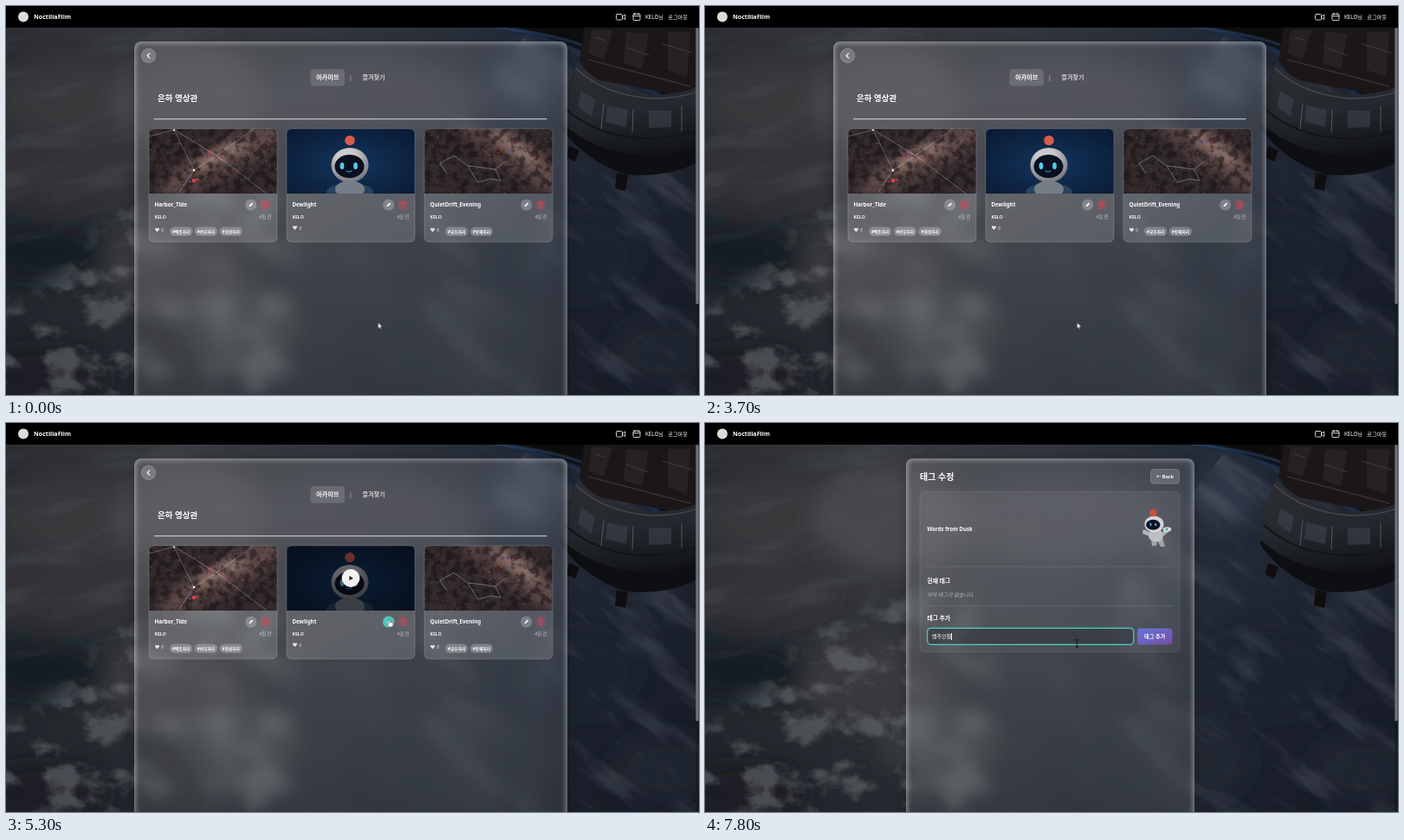
Animation of 800 by 450 pixels, one loop 8000 ms. Source, as an HTML page:

```html
<!DOCTYPE html>
<html lang="ko">
<head>
<meta charset="utf-8">
<title>은하 영상관</title>
<style>
html, body { margin: 0; width: 100%; height: 100%; overflow: hidden; background: #000; }
#stage { position: relative; width: 800px; height: 450px; overflow: hidden; }
#stage > * { position: absolute; }
svg { left: 0; top: 0; width: 800px; height: 450px; }
text, .typing { font-family: "Noto Sans", "Noto Sans CJK KR", sans-serif; fill: #fff; }
.b { font-weight: 700; }
.m { font-weight: 600; }
.mid { text-anchor: middle; }
.end { text-anchor: end; }
.line { fill: none; stroke: #fff; stroke-linecap: round; stroke-linejoin: round; }

.glass {
  top: 40.5px; height: 430px; box-sizing: border-box; border-radius: 8px;
  border: 1px solid rgba(255,255,255,.28);
  background: linear-gradient(rgba(255,255,255,.12), rgba(255,255,255,.085));
  backdrop-filter: blur(9px);
  box-shadow: inset 0 0 6px rgba(255,255,255,.5), 0 4px 14px rgba(0,0,0,.28);
}
.wide { left: 148px; width: 500px; }
.slim { left: 231.5px; width: 333px; }

.page1, .page2, .hover, .hot, .focus, .cursor, .arrow, .hand, .beam, .strip, .caret {
  animation: 8s step-end infinite;
}
.page1 { animation-name: page1; }
.page2 { animation-name: page2; }
.hover { animation-name: hover; }
.hot { animation-name: hot; }
.focus { animation-name: focus; }
.cursor { animation-name: move; }
.arrow { animation-name: arrow; }
.hand { animation-name: hand; }
.beam { animation-name: page2; }
.strip { animation-name: type; }
.caret { animation-name: blink; }

@keyframes page1 { 0% { opacity: 1 } 71.25%, to { opacity: 0 } }
@keyframes page2 { 0% { opacity: 0 } 71.25%, to { opacity: 1 } }
@keyframes hover { 0% { opacity: 0 } 53.75% { opacity: .4 } 55% { opacity: .75 } 56.25%, to { opacity: 1 } }
@keyframes hot { 0% { opacity: 0 } 57.5% { opacity: .35 } 58.75% { opacity: .65 } 60% { opacity: .9 } 61.25%, to { opacity: 1 } }
@keyframes focus { 0% { opacity: 0 } 71.25% { opacity: .3 } 72.5% { opacity: .7 } 73.75%, to { opacity: 1 } }
@keyframes arrow { 0% { opacity: 1 } 53.75%, to { opacity: 0 } }
@keyframes hand { 0% { opacity: 0 } 53.75% { opacity: 1 } 71.25%, to { opacity: 0 } }
@keyframes move {
  0% { transform: translate(429.5px, 366px) }
  52.5% { transform: translate(435px, 304px) }
  53.75% { transform: translate(440px, 249px) }
  55% { transform: translate(441px, 238px) }
  56.25% { transform: translate(442px, 230px) }
  57.5% { transform: translate(442.5px, 227px) }
  71.25%, to { transform: translate(429.5px, 255px) }
}
@keyframes type {
  0% { transform: translateY(0) }
  78.75% { transform: translateY(-14px) }
  80% { transform: translateY(-28px) }
  82.5% { transform: translateY(-42px) }
  86.25% { transform: translateY(-56px) }
  87.5% { transform: translateY(-70px) }
  88.75% { transform: translateY(-84px) }
  90% { transform: translateY(-98px) }
  91.25% { transform: translateY(-112px) }
  92.5% { transform: translateY(-126px) }
  93.75% { transform: translateY(-140px) }
  95%, to { transform: translateY(-154px) }
}
@keyframes blink { 0% { opacity: 1 } 77.5% { opacity: 0 } 78.75%, to { opacity: 1 } }

.typing { left: 262px; top: 240px; width: 200px; height: 14px; overflow: hidden; color: #fff; font-size: 6.1px; font-weight: 500; }
.strip div { height: 14px; line-height: 14px; white-space: pre; }
.strip .hint { color: #a3a6ac; font-size: 5.9px; font-weight: 400; }
.caret { display: inline-block; width: .7px; height: 8px; margin-right: -.7px; background: #fff; vertical-align: -1.6px; }
</style>
</head>
<body>
<div id="stage">

<svg viewBox="0 0 800 450">
  <defs>
    <linearGradient id="earth">
      <stop offset="0" stop-color="#2b2d32"/><stop offset=".25" stop-color="#37393d"/>
      <stop offset=".5" stop-color="#31353d"/><stop offset=".75" stop-color="#232a37"/>
      <stop offset="1" stop-color="#1a202c"/>
    </linearGradient>
    <linearGradient id="fall" x2="0" y2="1">
      <stop offset=".35" stop-color="#12161f" stop-opacity="0"/><stop offset="1" stop-color="#12161f" stop-opacity=".5"/>
    </linearGradient>
    <linearGradient id="metal" x2=".2" y2="1">
      <stop offset="0" stop-color="#2c2e33"/><stop offset=".5" stop-color="#25282e"/><stop offset="1" stop-color="#0d0f13"/>
    </linearGradient>
    <filter id="soft" x="-40%" y="-40%" width="180%" height="180%"><feGaussianBlur stdDeviation="13"/></filter>
    <filter id="haze"><feGaussianBlur stdDeviation="1.2"/></filter>
    <filter id="cloud" x="0" y="0" width="100%" height="100%" color-interpolation-filters="sRGB">
      <feTurbulence type="fractalNoise" baseFrequency=".022 .03" numOctaves="6" seed="23"/>
      <feColorMatrix values="0 0 0 0 .4  0 0 0 0 .41  0 0 0 0 .43  5 0 0 0 -2.4"/>
    </filter>
    <filter id="streak" x="0" y="0" width="100%" height="100%" color-interpolation-filters="sRGB">
      <feTurbulence type="fractalNoise" baseFrequency=".009 .035" numOctaves="5" seed="5"/>
      <feColorMatrix values="0 0 0 0 .38  0 0 0 0 .4  0 0 0 0 .44  3.5 0 0 0 -1.7"/>
    </filter>
    <mask id="mass"><path d="M-30 370 60 315 130 235 240 190 330 220V480H-30Z" fill="#fff" filter="url(#soft)"/></mask>
  </defs>
  <rect width="800" height="450" fill="url(#earth)"/>
  <rect width="800" height="450" fill="url(#fall)"/>
  <g filter="url(#soft)">
    <ellipse cx="70" cy="110" rx="85" ry="45" fill="#413e40" opacity=".55"/>
    <ellipse cx="215" cy="110" rx="90" ry="60" fill="#505155" opacity=".7"/>
    <ellipse cx="60" cy="195" rx="90" ry="30" fill="#393637" opacity=".8"/>
    <ellipse cx="40" cy="285" rx="75" ry="32" fill="#14181f" opacity=".8"/>
    <ellipse cx="190" cy="300" rx="80" ry="50" fill="#414247" opacity=".6"/>
    <ellipse cx="270" cy="370" rx="70" ry="40" fill="#404247" opacity=".7"/>
    <ellipse cx="40" cy="430" rx="80" ry="35" fill="#191d24" opacity=".7"/>
    <ellipse cx="420" cy="110" rx="130" ry="50" fill="#434750" opacity=".6"/>
    <ellipse cx="600" cy="85" rx="40" ry="35" fill="#343f4f" opacity=".7"/>
    <ellipse cx="520" cy="390" rx="110" ry="60" fill="#252a35" opacity=".7"/>
    <ellipse cx="650" cy="290" rx="80" ry="50" fill="#1a2130" opacity=".7"/>
    <ellipse cx="760" cy="400" rx="60" ry="40" fill="#262b36" opacity=".7"/>
  </g>
  <g mask="url(#mass)"><rect y="150" width="340" height="300" filter="url(#cloud)" opacity=".6"/></g>
  <g transform="rotate(-12)"><rect x="-60" y="20" width="300" height="250" filter="url(#streak)" opacity=".2"/></g>
  <g transform="rotate(38 660 250)"><rect x="480" y="60" width="420" height="420" filter="url(#streak)" opacity=".32"/></g>
  <path d="M552 22Q690 44 805 150V20Z" fill="#1d2f4c" filter="url(#haze)"/>
  <path d="M566 22Q695 44 805 140V20Z" fill="#07090e" filter="url(#haze)"/>
  <path d="M562 24Q625 31 664 45" class="line" style="stroke:#33557f" stroke-width="1.5" filter="url(#haze)"/>
  <g>
    <path d="M668 25 662 62 676 84 800 108V25Z" fill="#1b1718"/>
    <path d="M676 28 672 55 690 62 700 28ZM716 30 713 66 734 73 742 32ZM764 30V74L786 82 790 30Z" fill="#282122"/>
    <path d="M680 36 692 40M716 48 742 57M758 44 792 54M672 62 790 93" class="line" style="stroke:#403837" stroke-width="1.1"/>
    <path d="M660 66Q690 98 745 102 780 103 800 92V178Q765 198 716 194 668 178 641 141 640 100 660 66Z" fill="url(#metal)"/>
    <path d="M658 72Q690 103 745 107 780 107 800 98" class="line" style="stroke:#484b51" stroke-width="1.3"/>
    <path d="M645 118Q680 150 735 153 775 153 800 143" class="line" style="stroke:#121418" stroke-width="2"/>
    <path d="M664 98 680 108 676 128 660 116ZM694 115 718 120 716 140 692 134ZM742 121 768 121V140L742 141Z" fill="#3d434b" opacity=".6"/>
    <path d="M690 113 687 142M724 120 723 146M780 116V144" class="line" style="stroke:#5b5f66" stroke-width=".9"/>
    <path d="M641 135Q680 170 740 173 775 172 800 162V180Q765 199 716 195 668 179 641 141Z" fill="#0d0f13"/>
    <path d="M650 162 662 167 657 180 647 175ZM705 193 718 196 715 214 703 211Z" fill="#0f0d10"/>
  </g>
</svg>

<div class="glass wide page1"></div>
<svg class="page1" viewBox="0 0 800 450">
  <defs>
    <clipPath id="thumb"><path d="M0 75V6Q0 0 6 0H142Q148 0 148 6V75Z"/></clipPath>
    <filter id="glow" x="-50%" y="-50%" width="200%" height="200%"><feGaussianBlur stdDeviation="6"/></filter>
    <filter id="dust" x="0" y="0" width="100%" height="100%" color-interpolation-filters="sRGB">
      <feTurbulence type="fractalNoise" baseFrequency=".12" numOctaves="4" seed="3"/>
      <feColorMatrix values="0 0 0 0 .08  0 0 0 0 .06  0 0 0 0 .07  4 0 0 0 -1.7"/>
    </filter>
    <radialGradient id="night" cy=".55" r=".7"><stop stop-color="#12355c"/><stop offset="1" stop-color="#0a1a33"/></radialGradient>
    <radialGradient id="shell" cx=".4" cy=".25" r=".8"><stop offset=".3" stop-color="#cbcbcb"/><stop offset="1" stop-color="#6d7279"/></radialGradient>
  </defs>
  <circle cx="164.5" cy="57.5" r="8.3" fill="#fff" fill-opacity=".22" stroke="#fff" stroke-opacity=".35" stroke-width=".6"/>
  <path d="M165.8 54.8 163.2 57.5 165.8 60.2" class="line" stroke-width="1.1"/>
  <rect x="351.5" y="73" width="39.5" height="19.5" rx="4" fill="#fff" opacity=".15"/>
  <text x="371.2" y="85.3" class="b mid" font-size="7.1">아카이브</text>
  <text x="398" y="85" class="mid" font-size="7" fill-opacity=".65">|</text>
  <text x="424.5" y="85.3" class="m mid" font-size="7.1" fill-opacity=".72">즐겨찾기</text>
  <text x="175" y="110.3" class="b" font-size="9.5">은하 영상관</text>
  <path d="M171 130.7H624.5" stroke="#dcdcdd" stroke-width="1.1"/>
  <g id="cards"></g>
</svg>

<div class="glass slim page2"></div>
<svg class="page2" viewBox="0 0 800 450">
  <defs>
    <linearGradient id="violet" x2="1" y2="1"><stop stop-color="#6478dc"/><stop offset="1" stop-color="#764ba2"/></linearGradient>
  </defs>
  <text x="248" y="66" class="b" font-size="10">태그 수정</text>
  <g fill="#fff" stroke="#fff">
    <rect x="514.5" y="53.5" width="33" height="16.7" rx="3.5" fill-opacity=".18" stroke-opacity=".25" stroke-width=".7"/>
    <rect x="248" y="79" width="300" height="186" rx="5" fill-opacity=".06" stroke-opacity=".13" stroke-width=".7"/>
    <path d="M257 166H539.5M257 211.5H539.5" stroke-opacity=".14" stroke-width=".7"/>
  </g>
  <text x="531" y="64" class="m mid" font-size="5.5">← Back</text>
  <text x="256.5" y="125.2" class="b" font-size="6.1">Words from Dusk</text>
  <g>
    <path d="M513 126 506 123 505 128 513 131ZM528 126 534 122 536 125 529 131Z" fill="#b4b5b8"/>
    <path d="M515 134 516 142H521L522 136ZM522 136 526 143H531L528 132Z" fill="#a2a4a8"/>
    <ellipse cx="520.5" cy="130" rx="8.5" ry="7.5" fill="#bdbec0"/>
    <ellipse cx="518.5" cy="117" rx="11" ry="9.5" fill="#d6d6d7"/>
    <ellipse cx="517.3" cy="117.7" rx="8.2" ry="6" fill="#0b1426"/>
    <ellipse cx="514.5" cy="117.5" rx="1" ry="1.7" fill="#5fb9d8"/>
    <ellipse cx="520.3" cy="117.5" rx="1" ry="1.7" fill="#5fb9d8"/>
    <circle cx="517.5" cy="104" r="4.3" fill="#c9523f"/>
    <ellipse cx="533.5" cy="123" rx="4.8" ry="2.8" fill="#d3dcdc"/>
    <circle cx="533" cy="123" r="1.4" fill="#3ca59a"/>
  </g>
  <text x="256.5" y="184.5" class="b" font-size="6.8">현재 태그</text>
  <text x="256.5" y="200.5" font-size="6" font-style="italic" fill-opacity=".6">아직 태그가 없습니다.</text>
  <text x="256.5" y="228" class="b" font-size="6.8">태그 추가</text>
  <rect x="256.7" y="237.3" width="238" height="19" rx="4" fill="#1c1f27" fill-opacity=".36" stroke="#fff" stroke-opacity=".35" stroke-width=".8"/>
  <rect class="focus" x="256.7" y="237.3" width="238" height="19" rx="4" fill="none" stroke="#45d0c0" stroke-width="1.2"/>
  <rect x="499" y="237.5" width="40.5" height="19" rx="4" fill="url(#violet)"/>
  <text x="519.2" y="249.3" class="b mid" font-size="6.2">태그 추가</text>
</svg>
<div class="typing page2"><div class="strip" id="strip"></div></div>

<svg viewBox="0 0 800 450">
  <rect width="800" height="25" fill="#000"/>
  <circle cx="20" cy="12.5" r="6" fill="#dcdcdc"/>
  <text x="32" y="14.7" class="b" font-size="7.1">NoctiliaFilm</text>
  <g class="line" stroke-width=".8">
    <rect x="704.5" y="9.5" width="7" height="6.5" rx="1.2"/>
    <path d="M711.5 12 714.8 10V15.5L711.5 13.5M724 11.7H732M726 8.3V10M730 8.3V10"/>
    <rect x="724" y="9.2" width="8" height="7.3" rx="1"/>
  </g>
  <text x="738" y="14.8" font-size="6.2" font-weight="500">KELO님</text>
  <text x="787" y="14.8" class="end" font-size="6.2" font-weight="500">로그아웃</text>
  <rect x="796" y="25" width="4" height="425" fill="#14171d" opacity=".45"/>
  <rect x="796.3" y="25" width="3.4" height="320" rx="1.7" fill="#85888e" opacity=".8"/>
  <g class="cursor">
    <path class="arrow" d="M0 0V7.3L1.7 5.8 2.8 8.2 3.9 7.7 2.8 5.3H5Z" fill="#fff" stroke="#111" stroke-width=".5"/>
    <path class="hand" d="M-.8 .6Q0-.5.8.6V3.3L3.8 4Q4.6 4.3 4.5 5.2L3.9 9H-.4L-2.8 5.7Q-2.7 4.6-1.7 5L-.8 5.8Z" fill="#fff" stroke="#111" stroke-width=".5"/>
    <path class="beam" d="M-1.5-4.2H1.5M0-4.2V4.2M-1.5 4.2H1.5" fill="none" stroke="#0b0c0f" stroke-width=".9"/>
  </g>
</svg>
</div>

<script>
let seed = 11;
const rnd = () => (seed = seed * 16807 % 2147483647) / 2147483647;
const range = (a, b) => a + rnd() * (b - a);
const dots = (n, make) => Array.from({ length: n }, make).join('');
const dot = (x, y, r, fill, op = 1) =>
  `<circle cx="${x.toFixed(1)}" cy="${y.toFixed(1)}" r="${r.toFixed(2)}" fill="${fill}" opacity="${op.toFixed(2)}"/>`;
const stars = (n, fill) => dots(n, () => dot(range(0, 148), range(0, 75), range(.2, .5), fill, range(.2, .8)));
const marks = (n, x0, x1, y0, y1) =>
  dots(n, (_, i) => dot(range(x0, x1), range(y0, y1), range(.5, 1.1), i % 3 ? '#e0384a' : '#4264d0', .9));

const galaxy = (tilt, x, y) => `
  <rect width="148" height="75" fill="#332a2c"/>
  <g filter="url(#glow)" transform="rotate(${tilt} ${x} ${y})">
    <ellipse cx="${x}" cy="${y}" rx="80" ry="19" fill="#5e4a49"/>
    <ellipse cx="${x}" cy="${y - 3}" rx="32" ry="9" fill="#94786f"/>
    <ellipse cx="${x - 8}" cy="${y + 5}" rx="45" ry="4" fill="#211a1d"/>
  </g>
  <rect width="148" height="75" filter="url(#dust)" opacity=".55"/>
  ${stars(260, '#cdbcb9')}`;

const swan = () => galaxy(-28, 85, 36) + `
  <path class="line" d="M0 9 29 1 52 48 34 75M52 48 78 31 121 0M78 31 136 75M29 1 78 31" stroke-width=".5" opacity=".55"/>
  ${marks(20, 60, 98, 22, 40)}${marks(7, 46, 58, 42, 63)}
  ${dot(52, 60, 2.3, '#e93c4b')}${dot(52, 48, 1.3, '#fff')}${dot(29, 1.5, 1, '#fff')}`;

const archer = () => galaxy(35, 102, 27) + `
  <path class="line" d="M18 40 34 31 50 43 68 45 82 47 88 60 76 58 62 62 50 43M82 47 93 38M18 40 26 52" stroke-width=".5" style="stroke:#cfdcf5" opacity=".75"/>
  ${marks(11, 74, 110, 10, 40)}${dot(94, 15, 1.3, '#5b66e8')}`;

const robot = () => `
  <rect width="148" height="75" fill="url(#night)"/>${stars(65, '#6c8fb5')}
  <ellipse cx="73" cy="73" rx="27" ry="10" fill="#40556e" opacity=".6"/>
  <ellipse cx="73" cy="70" rx="17" ry="10" fill="#767d86"/>
  <ellipse cx="73" cy="42" rx="21.5" ry="20" fill="url(#shell)"/>
  <ellipse cx="72.5" cy="43.5" rx="17" ry="13.5" fill="#0a1020"/>
  <ellipse cx="64" cy="43" rx="2.4" ry="4" fill="#55c9ef"/>
  <ellipse cx="79.5" cy="43" rx="2.4" ry="4" fill="#55c9ef"/>
  <path class="line" d="M69 49Q72 51 75 49" stroke-width=".8" style="stroke:#55c9ef"/>
  <circle cx="73" cy="13.5" r="5.8" fill="#d85a4b"/>
  <g class="hover">
    <rect width="148" height="75" fill="#04070d" opacity=".52"/>
    <circle cx="74" cy="37.5" r="10.4" fill="#f2f2f2"/>
    <path d="M72.3 34.8V40.2L76.8 37.5Z" fill="#222"/>
  </g>`;

const pill = (tag, i) => `
  <rect x="${24 + 28.8 * i}" y="113.5" width="26.3" height="10.5" rx="5.2" fill="#fff" opacity=".24"/>
  <text x="${37.15 + 28.8 * i}" y="120.5" class="b mid" font-size="4.7">#${tag}</text>`;

const card = ({ title, art, tags }, i) => {
  const y = tags.length ? 117 : 114.5;
  return `<g transform="translate(${165 + 159 * i} 142)">
    <path d="M0 75H148V125Q148 131 142 131H6Q0 131 0 125Z" fill="#fff" opacity=".15"/>
    <g clip-path="url(#thumb)">${art()}</g>
    <rect width="148" height="131" rx="6" fill="none" stroke="#fff" stroke-opacity=".22" stroke-width=".8"/>
    <text x="6.5" y="90.3" class="b" font-size="6.2">${title}</text>
    <circle cx="117.7" cy="88" r="6.6" fill="#fff" opacity=".24"/>
    ${i === 1 ? '<circle class="hot" cx="117.7" cy="88" r="6.6" fill="#4ccbc0"/>' : ''}
    <path d="M115.5 90.3 116 88.6 119 85.6 120.2 86.8 117.2 89.8Z" fill="#fff"/>
    <circle cx="134.2" cy="88" r="6.6" fill="#f0485c" opacity=".2"/>
    <path class="line" d="M131.8 86H136.6M133.3 86V84.9H135.1V86M132.4 86 132.7 91H135.7L136 86" stroke-width=".9" style="stroke:#e93b4e"/>
    <text x="6.5" y="104" class="m" font-size="5.2" fill-opacity=".9">KELO</text>
    <text x="141.5" y="104" class="end" font-size="5.3" fill-opacity=".65">4일 전</text>
    <path transform="translate(9.5 ${y})" d="M0 2.4-2.3 0C-3.3-2-.8-3 0-1.2.8-3 3.3-2 2.3 0Z" fill="#e3e3e4"/>
    <text x="14.2" y="${y + 2}" font-size="5.2" fill-opacity=".85">0</text>
    ${tags.map(pill).join('')}
  </g>`;
};

document.getElementById('cards').innerHTML = [
  { title: 'Harbor_Tide', art: swan, tags: ['백조자리', '여우자리', '화살자리'] },
  { title: 'Dewlight', art: robot, tags: [] },
  { title: 'QuietDrift_Evening', art: archer, tags: ['궁수자리', '방패자리'] }
].map(card).join('');

// One line per keystroke; the strip steps up a line at a time.
const caret = '<i class="caret"></i>';
const strokes = 'ㅂ 배 뱀 뱀ㅈ 뱀주 뱀중 뱀주이 뱀주인 뱀주읹 뱀주인자 뱀주인잘'.split(' ');
document.getElementById('strip').innerHTML =
  `<div class="hint">${caret}새 태그 입력...</div>` + strokes.map(s => `<div>${s}${caret}</div>`).join('');
</script>
</body>
</html>
```
